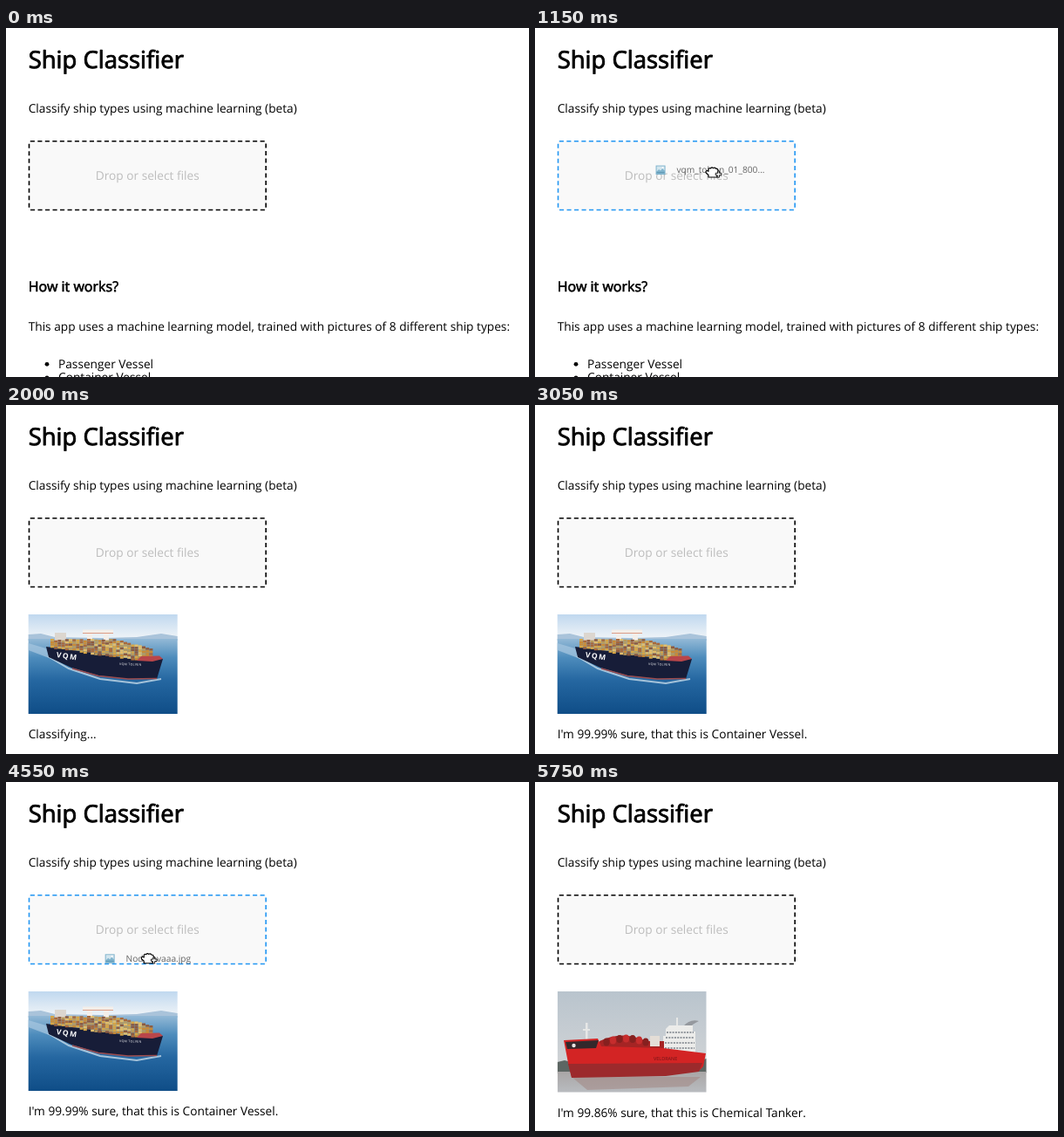
These frames come from a looping animation (600x400 px, 8000 ms). An HTML page:

```html
<!DOCTYPE html>
<html lang="en">
<head>
<meta charset="utf-8">
<title>Ship Classifier</title>
<style>
  html, body { margin: 0; width: 100%; height: 100%; overflow: hidden; background: #fff; }
  svg { display: block; width: 100%; height: 100%; }
  text { font: 13.69px "Open Sans", "Noto Sans", sans-serif; text-rendering: geometricPrecision; }
  .bold { stroke: #000; stroke-linejoin: round; }
  .h1 { font-size: 27.43px; stroke-width: .9px; }
  .h3 { font-size: 16.05px; stroke-width: .62px; }
  .file { font-size: 10.2px; fill: #555; }
  .hull { font-weight: 700; font-size: 8.5px; fill: #fff; letter-spacing: 1.6px; }
  .tiny { font-size: 3.6px; letter-spacing: .3px; }
  .name { font-size: 5.5px; fill: #721418; }
</style>
</head>
<body>
<svg viewBox="0 0 600 400">
  <defs>
    <linearGradient id="sky" x2="0" y2="1">
      <stop offset="0" stop-color="#c0d8ef"/><stop offset="1" stop-color="#f3f6f8"/>
    </linearGradient>
    <linearGradient id="sea" x2="0" y2="1">
      <stop offset="0" stop-color="#93b9d6"/><stop offset=".25" stop-color="#4d8cbc"/>
      <stop offset=".55" stop-color="#2567a1"/><stop offset="1" stop-color="#0f4d87"/>
    </linearGradient>
    <linearGradient id="grey" x2="0" y2="1">
      <stop offset="0" stop-color="#b9c4cd"/><stop offset="1" stop-color="#d3d5d7"/>
    </linearGradient>
    <linearGradient id="river" x2="0" y2="1">
      <stop offset="0" stop-color="#a9a6a6"/><stop offset="1" stop-color="#b9bcc0"/>
    </linearGradient>
    <clipPath id="crop"><rect x="25.7" y="240" width="171" height="115.5"/></clipPath>
  </defs>

  <text class="bold h1" x="25.7" y="46">Ship Classifier</text>
  <text x="25.7" y="97">Classify ship types using machine learning (beta)</text>

  <rect id="zone" x="26.5" y="129.8" width="271.7" height="78.7" rx="1.3" fill="#f9f9f9"
    stroke-width="1.6" pathLength="410" stroke-dasharray="3 2"/>
  <text x="162.2" y="174.2" text-anchor="middle" fill="#bdbdbd">Drop or select files</text>

  <g id="intro">
    <text class="bold h3" x="25.7" y="302.2">How it works?</text>
    <text x="25.7" y="346.7">This app uses a machine learning model, trained with pictures of 8 different ship types:</text>
    <circle cx="47" cy="385.3" r="2.4"/>
    <text x="60" y="389.6">Passenger Vessel</text>
    <circle cx="47" cy="400.8" r="2.4"/>
    <text x="60" y="405">Container Vessel</text>
  </g>

  <g id="cargo">
    <rect x="25.7" y="240" width="171" height="30" fill="url(#sky)"/>
    <path d="M25.7 263 40 262 56 266 110 267 150 266 178 262 196.7 265V270H25.7Z" fill="#a9c3da"/>
    <rect x="25.7" y="268" width="171" height="86" fill="url(#sea)"/>
    <path d="M25.7 273 46 279 52 291 25.7 281Z" fill="#a5c6df" opacity=".75"/>
    <path d="M48 288 72 302 108 314 150 319 178 314" fill="none" stroke="#c5dae9" stroke-width="2" opacity=".8"/>
    <path d="M46 277 100 284 150 292 180 291 173 314 140 314 106 310 75 301 49 289Z" fill="#171d38"/>
    <path d="M76 302 106 310.5 140 314 173 313.5" fill="none" stroke="#9c4b4d" stroke-width="1.5"/>
    <path d="M88 257.5H123V261.5H118V272H112V261.5H99V270H93V261.5H88Z" fill="#f3eee9"/>
    <path d="M88 261.5H123" stroke="#d98a6c" stroke-width=".8"/>
    <path d="M56 261H69V272H56Z" fill="#dcd6cf"/>
    <g id="boxes"></g>
    <path d="M150 293 155 288 176 287.5 180 291 168 294Z" fill="#b9464a"/>
    <text class="hull" transform="translate(57.5 289) rotate(8)">VQM</text>
    <text class="tiny" fill="#fff" transform="translate(130 298) rotate(2)">VQM TOLVEN</text>
  </g>

  <g id="tanker" clip-path="url(#crop)">
    <rect x="25.7" y="240" width="171" height="94" fill="url(#grey)"/>
    <path d="M25.7 321 34 319 48 323V334H25.7ZM183 321 196.7 317V333H183Z" fill="#5d6663"/>
    <rect x="25.7" y="332" width="171" height="24" fill="url(#river)"/>
    <path d="M42 338H190L176 349 60 353Z" fill="#a28784" opacity=".55"/>
    <path d="M58 276H60.5V296H58ZM55 283H63V285H55ZM162 270H164V281H162Z" fill="#e6e7e6"/>
    <path d="M170 280Q178 271 188 274 181 277 177 282Z" fill="#77797d" opacity=".6"/>
    <path d="M150 283 154 279H181V286H184V312H147V291H150Z" fill="#ececea"/>
    <path d="M151 287H182M150 293H183M149 299H183M149 305H183" stroke="#777e85" stroke-width="1.3" stroke-dasharray="2 1.3"/>
    <path d="M74 297Q100 284 128 297H148V307H74Z" fill="#a52424"/>
    <g id="tanks"></g>
    <path d="M132 291H143V303H132Z" fill="#e4ddd6"/>
    <path d="M33 296 72 294 76 303 147 305 196 311 193 326 188 331 150 336 42 338 38 322Z" fill="#d32424"/>
    <path d="M38 323 192 322 188 332 150 337 42 339Z" fill="#9c2a2c"/>
    <path d="M35 298 73 296 70 305 37 306Z" fill="#33282b"/>
    <circle cx="44.5" cy="302" r="2.2" fill="#e9e4e2"/>
    <text class="name" x="136" y="319">VELDRANE</text>
  </g>

  <text id="status" x="25.7"></text>

  <g id="drag" opacity=".9">
    <path d="M-5.5 -5H5.5V5.5H-5.5Z" fill="#74adc9"/>
    <path d="M-4.5 -4H4.5V1L2 -1.5 0 1-2 -.5-4.5 2Z" fill="#cfe4ee"/>
    <circle cx="2.5" cy="-2.5" r="1" fill="#fff"/>
    <path d="M-4.5 3H4.5" stroke="#4f8dad"/>
    <text id="fileName" class="file" x="18.3" y="3.8"></text>
  </g>

  <g id="grab" fill="#fff" stroke="#000" stroke-width="1.15" stroke-linejoin="round">
    <path d="M-5 5.5V3L-7.8 .5Q-8.5 -1.8-6.5 -2L-5 -1.2V-3.5Q-4.5 -5.5-2.5 -4.6-1 -6.5 .5 -4.9 2.5 -6 3.5 -4.2 6 -4.5 6 -2V2L4.5 5.5Z"/>
    <path d="M3.2 .8H5.8V-1.7H7.4V.8H9.9V3.2H7.4V5.7H5.2V3.2H3.2Z" stroke-width=".9"/>
  </g>

  <path id="hand" d="M-3.5 7.5V5L-6.5 2Q-7 0-5 .2L-2 1.2-3.5 -4.5Q-2.6 -6.5-1.2 -5L.3 -1.5 5 -.8Q6.8 -.4 6.8 1.5V4L5.5 7.5Z"
    fill="#fff" stroke="#000" stroke-width="1.3" stroke-linejoin="round"/>
</svg>
<script>
const LOOP = 8000, TICK = 50, LAG = 12;
const $ = id => document.getElementById(id);
const clamp = x => Math.min(1, Math.max(0, x));
const easeOut = x => x * (2 - x);
const smooth = x => x * x * (3 - 2 * x);
const linear = x => x;

// Point on the way from a to b between times t0 and t1
function move(t, t0, t1, a, b, ease) {
  const k = ease(clamp((t - t0) / (t1 - t0)));
  return a.map((v, i) => v + (b[i] - v) * k);
}

const DRAGS = [
  { from: 400, to: 1400, name: 'vqm_tolven_01_800...', grip: [-60, -3],
    path: t => t < 550
      ? move(t, 400, 550, [528, 392], [401, 292], linear)
      : move(t, 550, 1150, [401, 292], [204, 165.5], easeOut) },
  { from: 4200, to: 5150, name: 'Nod_Tovaaa.jpg', grip: [-46, -3],
    path: t => move(t, 4200, 4800, [255, 351], [144, 171], easeOut) }
];

const HOVERS = [
  { from: 1400, to: 1900, a: [204, 173], b: [345, 196] },
  { from: 5150, to: 5650, a: [144, 173], b: [304, 190] }
];

const STATUS = [
  [0, ''], [1400, 'Loading model...'], [1900, 'Classifying...'],
  [3050, "I'm 99.99% sure, that this is Container Vessel."],
  [5150, 'Loading model...'], [5400, 'Classifying...'],
  [5700, "I'm 99.86% sure, that this is Chemical Tanker."]
];

function random(seed) {
  return () => (seed = seed * 16807 % 2147483647) / 2147483647;
}

function buildCargo() {
  const next = random(77);
  const tones = ['#d6a545', '#c98a35', '#e2bd6a', '#a8693c', '#b79a5c', '#8d5a3e'];
  let out = '';
  for (let x = 51; x < 168; x += 4.2) {
    const top = 268 + Math.max(0, x - 125) * .27 + next() * 2;
    const base = Math.min(291, 277 + (x - 50) * .145);
    for (let y = top; y < base; y += 2.6) {
      const tone = tones[Math.floor(next() * tones.length)];
      out += `<rect x="${x.toFixed(1)}" y="${y.toFixed(1)}" width="4" height="2.5" fill="${tone}"/>`;
    }
  }
  $('boxes').innerHTML = out;
}

function buildTanks() {
  let out = '';
  for (let i = 0; i < 7; i++) {
    const x = 82 + i * 7.5, y = 298 - 4 * Math.sin(i / 6 * Math.PI);
    out += `<ellipse cx="${x}" cy="${y}" rx="3.6" ry="4.5" fill="${i % 2 ? '#c62d2d' : '#86201f'}"/>`;
  }
  $('tanks').innerHTML = out;
}

const show = (id, on) => $(id).setAttribute('display', on ? 'inline' : 'none');
const place = (id, [x, y]) => $(id).setAttribute('transform', `translate(${x.toFixed(2)} ${y.toFixed(2)})`);

function render(time) {
  const t = Math.floor(time % LOOP / TICK) * TICK;
  const active = s => t >= s.from && t < s.to;
  const drag = DRAGS.find(active), hover = HOVERS.find(active);
  const second = t >= 5400;
  let blue = false;

  show('drag', drag);
  show('grab', drag);
  show('hand', hover);
  if (drag) {
    const cursor = drag.path(t);
    const late = drag.path(t - LAG);
    place('grab', cursor);
    place('drag', late.map((v, i) => v + drag.grip[i]));
    $('fileName').textContent = drag.name;
    blue = cursor[0] < 299 && cursor[1] < 209;
  }
  if (hover) {
    place('hand', move(t, hover.from + 100, hover.to, hover.a, hover.b, smooth));
    blue = t < hover.from + 250;
  }

  $('zone').setAttribute('stroke', blue ? '#2196f3' : '#000');
  show('intro', t < 1400);
  show('cargo', t >= 1400 && !second);
  show('tanker', second);
  $('status').textContent = STATUS.filter(s => t >= s[0]).pop()[1];
  $('status').setAttribute('y', second ? 383.6 : 381.8);
}

buildCargo();
buildTanks();
const start = performance.now();
function frame() {
  render(performance.now() - start);
  requestAnimationFrame(frame);
}
frame();
</script>
</body>
</html>
```
